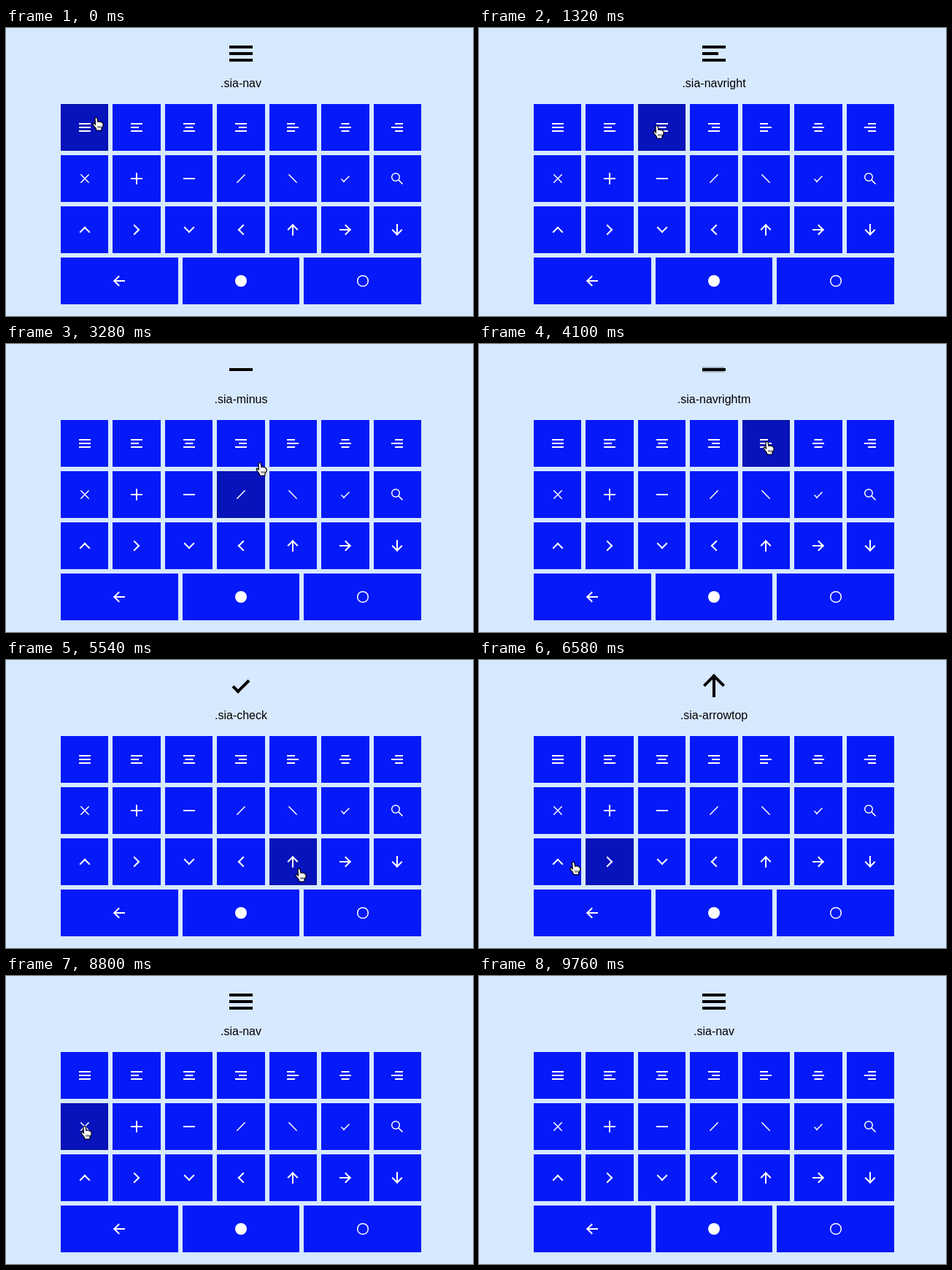
An HTML page with a canvas that plays this animation: 640 by 394 pixels, repeating every 9780 ms.

```html
<!DOCTYPE html>
<html lang="en">
<head>
<meta charset="utf-8">
<title>Animated icon grid</title>
<style>
html, body { margin: 0; width: 100%; height: 100%; overflow: hidden; background: #d7e9ff; }
canvas { display: block; }
</style>
</head>
<body>
<canvas id="stage" width="640" height="394"></canvas>
<script>
const ctx = document.getElementById('stage').getContext('2d');
const LOOP = 9780, MORPH = 300;
const mix = (a, b, p) => a + (b - a) * p;

// Every icon is made of three bars, given by centre, length, angle and opacity.
const bar = (x, y, len, angle = 0, alpha = 1) => ({ x, y, len, angle, alpha });
const hidden = (len = 16) => bar(0, 0, len, 0, 0);
const slash = angle => [hidden(), bar(0, 0, 16, angle), hidden()];

// A bar between two points; its end is extended to make square corners.
function arm(x1, y1, x2, y2, extend = 1) {
  const length = Math.hypot(x2 - x1, y2 - y1), k = 1 + extend / length;
  const angle = Math.atan2(y2 - y1, x2 - x1) * 180 / Math.PI;
  return bar(x1 + (x2 - x1) * k / 2, y1 + (y2 - y1) * k / 2, length * k, angle);
}

function turn(bars, degrees) {
  const r = degrees * Math.PI / 180, c = Math.cos(r), s = Math.sin(r);
  return bars.map(b => ({ ...b, x: b.x * c - b.y * s, y: b.x * s + b.y * c, angle: b.angle + degrees }));
}

function makeIcons(pitch) {
  const lines = (outer, middle, side) => [outer, middle, outer].map(
    (len, i) => bar(side * (16 - len) / 2, (i - 1) * pitch, len));
  const chevron = [arm(-6.8, 3.8, 0, -3), hidden(), arm(6.8, 3.8, 0, -3)];
  const arrow = [arm(-6.8, .2, 0, -6.6), bar(0, .5, 15, 90), arm(6.8, .2, 0, -6.6)];
  return [
    lines(16, 16, 0), lines(16, 11, -1), lines(16, 11, 0), lines(16, 11, 1),
    lines(11, 16, -1), lines(11, 16, 0), lines(11, 16, 1),
    [bar(0, 0, 16, 45), hidden(), bar(0, 0, 16, -45)],
    [bar(0, 0, 16, 90), bar(0, 0, 16), hidden()],
    [hidden(), bar(0, 0, 16), hidden()],
    slash(-45), slash(45),
    [arm(-5.5, .5, -2, 4), hidden(), arm(5.5, -3.5, -2, 4)],
    null,
    ...[0, 90, 180, 270].map(a => turn(chevron, a)),
    ...[0, 90, 180, 270].map(a => turn(arrow, a))
  ];
}
const smallIcons = makeIcons(5), largeIcons = makeIcons(4.5);
const SEARCH = 13, DOT = 22, CIRCLE = 23;
const thinIcons = [7, 10, 11, 12];

const tiles = Array.from({ length: 24 }, (_, i) => {
  const row = Math.min(3, Math.floor(i / 7)), count = row < 3 ? 7 : 3;
  const width = (494 - 6 * (count - 1)) / count;
  const left = 75 + (i - row * 7) * (width + 6);
  const x = Math.round(left);
  return { x, y: 104 + row * 70, w: Math.round(left + width) - x, h: 64, cx: Math.round(left + width / 2) };
});

// Time, icon chosen, label.
const clicks = [
  [-MORPH, 0, 'nav'], [800, 1, 'navright'], [1420, 2, 'navcenter'], [2120, 3, 'navleft'],
  [2980, 9, 'minus'], [4010, 4, 'navrightm'], [5050, 12, 'check'], [5900, 18, 'arrowtop'],
  [6900, 14, 'top'], [7860, 0, 'nav'], [8850, 7, 'close'], [9380, 0, 'nav']
];

// Time, x, y of the hand.
const path = [
  [0, 126, 131], [150, 126, 131], [600, 182, 140], [900, 182, 140], [1200, 246, 142], [1550, 246, 142],
  [1850, 318, 142], [2250, 318, 142], [2700, 254, 212], [3040, 254, 212], [3215, 328, 196],
  [3280, 350, 171], [3550, 397, 142], [4200, 397, 142], [4700, 466, 212], [5150, 466, 212],
  [5500, 404, 294], [5950, 404, 294], [6700, 112, 284], [7050, 112, 284], [7500, 114, 149],
  [8000, 114, 149], [8500, 110, 214], [8950, 110, 214], [9250, 112, 146]
];
const HAND_GONE = 9640, HOVER_LAG = 60;
const hand = new Path2D('M-4-7.5Q-2.5-9.5-1-7.5L0-2.5 2-3 5-2 7-.5V3L5 6V9H-2L-3 6-7 1-6-1-3.500 1Z');
const knuckles = new Path2D('M0 3V6M2 3V6M4 3V6');

function handAt(t) {
  const i = path.findLastIndex(p => p[0] <= Math.max(0, t));
  const a = path[i], b = path[i + 1] || a;
  const p = b === a ? 0 : (Math.max(0, t) - a[0]) / (b[0] - a[0]);
  const eased = p * p * (3 - 2 * p);
  return { x: mix(a[1], b[1], eased), y: mix(a[2], b[2], eased) };
}

function drawBars(bars, x, y, scale, thickness, color) {
  ctx.fillStyle = color;
  for (const b of bars) {
    if (!b.alpha) continue;
    ctx.save();
    ctx.translate(x, y);
    ctx.scale(scale, scale);
    ctx.translate(b.x, b.y);
    ctx.rotate(b.angle * Math.PI / 180);
    ctx.globalAlpha = b.alpha;
    ctx.fillRect(-b.len / 2, -thickness / 2, b.len, thickness);
    ctx.restore();
  }
}

function circle(x, y, r, filled) {
  ctx.beginPath();
  ctx.arc(x, y, r, 0, 7);
  ctx.lineWidth = 1.5;
  ctx.fillStyle = ctx.strokeStyle = '#fff';
  if (filled) ctx.fill(); else ctx.stroke();
}

function drawTile(tile, i, hovered) {
  const { x, y, w, h, cx } = tile, cy = y + 32;
  ctx.fillStyle = hovered ? '#0713bb' : '#0519f9';
  ctx.fillRect(x, y, w, h);
  if (hovered) {
    ctx.strokeStyle = '#050d86';
    ctx.lineWidth = 1;
    ctx.setLineDash([1, 1]);
    ctx.strokeRect(x + .5, y + .5, w - 1, h - 1);
    ctx.setLineDash([]);
  }
  if (i === DOT) circle(cx, cy, 8, true);
  else if (i === CIRCLE) circle(cx, cy, 7.3, false);
  else if (i === SEARCH) {
    circle(cx - 2, cy - 2, 5.3, false);
    drawBars([arm(2, 2, 7.5, 7.5, 0)], cx, cy, 1, 1.7, '#fff');
  } else drawBars(smallIcons[i], cx, cy, 1, thinIcons.includes(i) ? 1.5 : 2, '#fff');
}

function drawChosen(t) {
  const i = clicks.findLastIndex(c => c[0] <= t);
  const [start, icon, label] = clicks[i];
  const p = Math.min(1, (t - start) / MORPH);
  const eased = p * p * (3 - 2 * p);
  const from = largeIcons[clicks[Math.max(0, i - 1)][1]];
  const bars = largeIcons[icon].map((to, n) => {
    const b = {};
    for (const key in to) b[key] = mix(from[n][key], to[key], eased);
    return b;
  });
  drawBars(bars, 322, 35, 2, 2, '#000');
  ctx.fillStyle = '#000';
  ctx.font = '16px "Liberation Sans", Arial, sans-serif';
  ctx.textAlign = 'center';
  ctx.fillText('.sia-' + label, 322, 81);
}

function drawHand({ x, y }) {
  ctx.save();
  ctx.translate(x, y);
  ctx.fillStyle = '#fff';
  ctx.strokeStyle = '#000';
  ctx.lineWidth = 1.2;
  ctx.fill(hand);
  ctx.stroke(hand);
  ctx.lineWidth = .8;
  ctx.stroke(knuckles);
  ctx.restore();
}

function draw(now) {
  const t = now % LOOP, visible = t < HAND_GONE;
  const spot = handAt(t - HOVER_LAG);
  const hx = spot.x - 2, hy = spot.y - 9;
  ctx.fillStyle = '#d7e9ff';
  ctx.fillRect(0, 0, 640, 394);
  drawChosen(t);
  tiles.forEach((tile, i) => {
    const inside = hx >= tile.x && hx < tile.x + tile.w && hy >= tile.y && hy < tile.y + tile.h;
    drawTile(tile, i, visible && inside);
  });
  if (visible) drawHand(handAt(t));
}

const began = performance.now();
function frame() {
  draw(performance.now() - began);
  requestAnimationFrame(frame);
}
frame();
</script>
</body>
</html>
```
